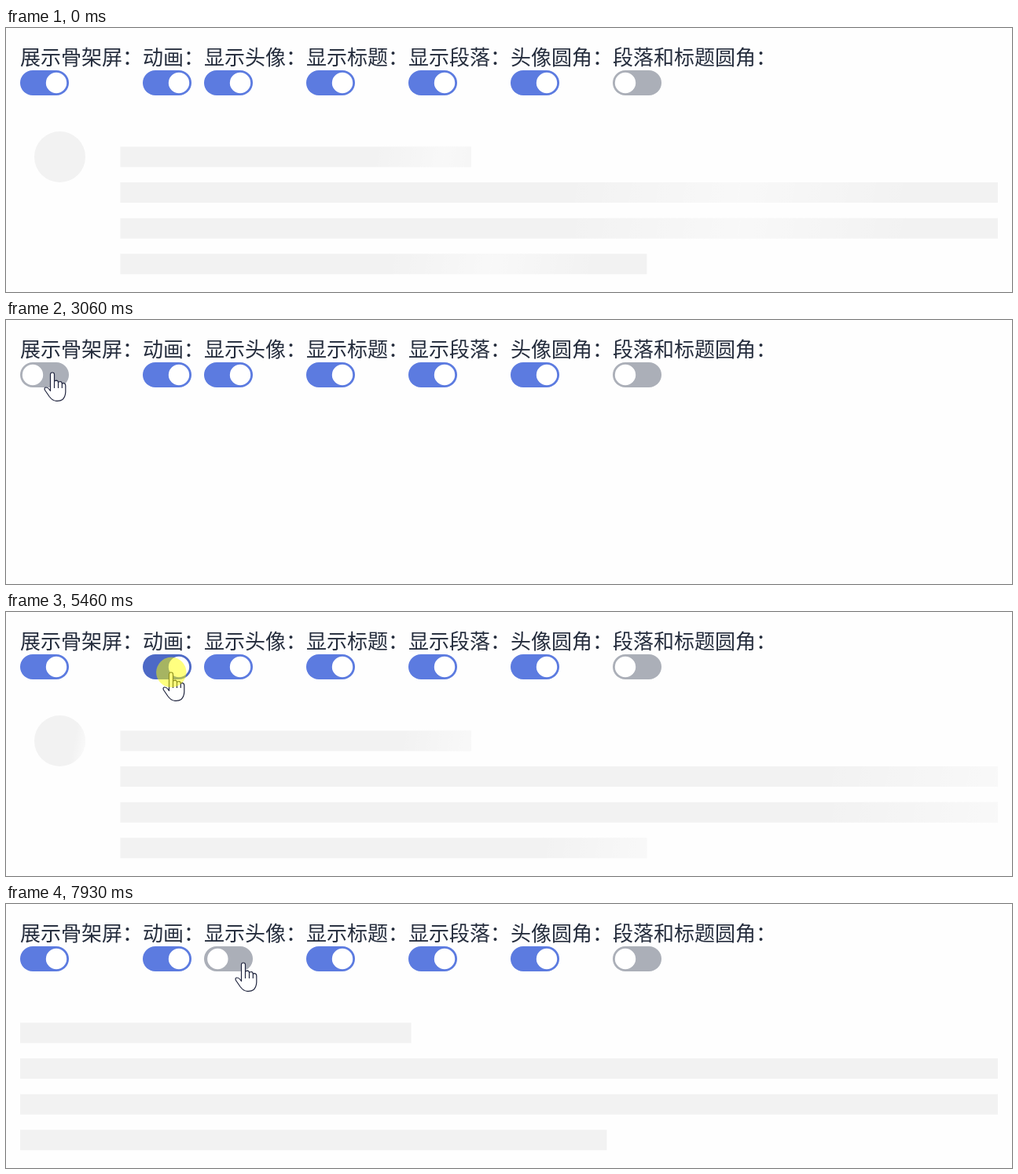
Write an HTML page with a canvas that moves like this. It is 1280x337 px and loops after 8000 ms.

```html
<!DOCTYPE html>
<html lang="zh-CN">
<head>
<meta charset="utf-8">
<title>骨架屏</title>
<style>
  html, body { margin: 0; width: 100%; height: 100%; overflow: hidden; background: #fefefe; }
  body { position: relative; font: 26px/26px "Noto Sans CJK SC", "Noto Sans CJK", sans-serif; color: #242c3c; }
  span { position: absolute; top: 23px; white-space: nowrap; }
  canvas { position: absolute; left: 0; top: 0; }
</style>
</head>
<body>
<canvas id="stage" width="1280" height="337"></canvas>
<script>
const LOOP = 8000;
const canvas = document.getElementById('stage');
const ctx = canvas.getContext('2d');

const ON = [92, 123, 224], HOVER = [77, 105, 198], OFF = [171, 175, 184];
const FILL = '#f2f2f2';

// flips: times at which a switch changes state; hover: when the pointer is over it
const switches = [
  { text: '展示骨架屏：', x: 18, on: true, flips: [2720, 3925], hover: [2230, 4560] },
  { text: '动画：', x: 174, on: true, flips: [5480, 7220], hover: [4735, 7380] },
  { text: '显示头像：', x: 252, on: true, flips: [7795], hover: [7500, LOOP] },
  { text: '显示标题：', x: 382, on: true },
  { text: '显示段落：', x: 512, on: true },
  { text: '头像圆角：', x: 642, on: true },
  { text: '段落和标题圆角：', x: 772, on: false }
];
const HIDE = 2720, SHOW = 3905, STILL = 5480, SHIMMER = 7220, NO_AVATAR = 7790;
const presses = [[2580, 2720], [3720, 3905], [5320, 5480], [7080, 7220], [7650, 7785]];

// pointer tracks: [time, x, y]
const pass = [[760, 256, 322], [880, 215, 252], [1000, 150, 210], [1110, 90, 250], [1235, 51, 337]];
const work = [
  [1730, -4, 290], [1900, 12, 225], [2080, 38, 130], [2230, 56, 74], [2300, 58, 66],
  [2800, 58, 66], [2870, 59, 67], [4470, 59, 67], [4600, 110, 69], [4750, 196, 73],
  [4890, 207, 76], [5030, 210, 77], [7290, 210, 77], [7390, 240, 76], [7500, 290, 75],
  [7590, 302, 75], [LOOP, 302, 75]
];

const hand = new Path2D(
  'M-2.5 2.5Q-2.5 0 0 0Q2.5 0 2.5 2.5V12Q2.8 10.2 5 10.2Q7.5 10.3 7.5 13' +
  'Q8 11.5 10 11.5Q12.3 11.8 12.3 14.5Q12.8 13.4 14.5 13.6Q16.8 14 16.8 17V25' +
  'Q16.5 31 13 34.5Q10 36.8 5 36.4Q0 36 -4 30.5L-9.5 22.5Q-10.8 19.5 -8.4 19' +
  'Q-6 18.8 -4 21.5L-2.5 23.5ZM2.5 12V19.5M7.5 13V19.5M12.3 14.5V19.5');
const arrow = new Path2D('M0 0V25L5.8 19.8L9.6 28.4L13.4 26.8L9.8 18.4H17.6Z');

for (const s of switches) {
  const label = document.createElement('span');
  label.textContent = s.text;
  label.style.left = s.x + 'px';
  document.body.insertBefore(label, canvas);
}

const clamp = v => Math.min(1, Math.max(0, v));
const ramp = (t, start, length) => clamp((t - start) / length);
const mix = (a, b, k) => a + (b - a) * k;
const mixColor = (a, b, k) => a.map((v, i) => mix(v, b[i], k));

// cubic-bezier(.42, 0, .58, 1)
function easeInOut(x) {
  let lo = 0, hi = 1, u = x;
  for (let i = 0; i < 18; i++) {
    u = (lo + hi) / 2;
    const at = 1.26 * u * (1 - u) * (1 - u) + 1.74 * u * u * (1 - u) + u * u * u;
    if (at < x) lo = u; else hi = u;
  }
  return u * u * (3 - 2 * u);
}

function along(track, t) {
  let i = 1;
  while (i < track.length - 1 && t > track[i][0]) i++;
  const [t0, x0, y0] = track[i - 1], [t1, x1, y1] = track[i];
  const k = ramp(t, t0, t1 - t0);
  return [mix(x0, x1, k), mix(y0, y1, k)];
}

// state of a switch, 0 to 1
function level(s, t, length) {
  let from = s.on ? 1 : 0, value = from;
  for (const flip of s.flips || []) {
    if (t < flip) break;
    value = mix(from, 1 - from, easeInOut(ramp(t, flip, length)));
    from = 1 - from;
  }
  return value;
}

function drawSwitch(s, t) {
  const over = s.hover ? ramp(t, s.hover[0], 250) - ramp(t, s.hover[1], 250) : 0;
  const color = mixColor(OFF, mixColor(ON, HOVER, over), level(s, t, 100));
  ctx.fillStyle = `rgb(${color.map(Math.round)})`;
  ctx.beginPath();
  ctx.roundRect(s.x, 54, 62, 32, 16);
  ctx.fill();
  ctx.fillStyle = '#fff';
  ctx.beginPath();
  ctx.arc(s.x + mix(16, 46, level(s, t, 160)), 70, 13.2, 0, 7);
  ctx.fill();
}

// a block with a light band, tilted by 10 degrees, on a tile twice its width
function block(x, y, w, h, radius, phase) {
  ctx.beginPath();
  ctx.roundRect(x, y, w, h, radius);
  ctx.fillStyle = FILL;
  ctx.fill();
  if (phase === null) return;
  const k = easeInOut((phase / 2000) % 1);
  const cx = x + w * mix(-0.8, 1.2, k), cy = y + h / 2;
  const dx = Math.sin(Math.PI / 1.8), dy = -Math.cos(Math.PI / 1.8);
  const half = (2 * w * dx + h * dy) / 10;
  const g = ctx.createLinearGradient(cx - dx * half, cy - dy * half, cx + dx * half, cy + dy * half);
  g.addColorStop(0, 'rgba(255,255,255,0)');
  g.addColorStop(0.5, 'rgba(255,255,255,.5)');
  g.addColorStop(1, 'rgba(255,255,255,0)');
  ctx.fillStyle = g;
  ctx.fill();
}

function drawSkeleton(t) {
  if (t >= HIDE && t < SHOW) return;
  const phase = first =>
    t < HIDE ? t + first : t < STILL ? t - SHOW : t < SHIMMER ? null : t - SHIMMER;
  const avatar = t < NO_AVATAR;
  const x = avatar ? 145.4 : 18, w = 1262 - x;
  if (avatar) block(36, 132, 65, 65, 32.5, phase(130));
  block(x, 151.5, w * 0.4, 26, 0, phase(1480));
  block(x, 197, w, 26, 0, phase(1310));
  block(x, 242.7, w, 26, 0, phase(1310));
  block(x, 288.2, w * 0.6, 26, 0, phase(1310));
}

function drawPointer(t) {
  const passing = t >= 760 && t < 1235;
  if (!passing && t < 1730) return;
  const [x, y] = along(passing ? pass : work, t);
  const shape = switches.some(s => s.hover && x >= s.x && x <= s.x + 62 && y >= 54 && y <= 86) ? hand : arrow;
  ctx.save();
  ctx.translate(x, y);
  ctx.fillStyle = '#fff';
  ctx.strokeStyle = '#20253f';
  ctx.lineWidth = 1.2;
  ctx.lineJoin = ctx.lineCap = 'round';
  ctx.fill(shape);
  ctx.stroke(shape);
  ctx.restore();
  if (presses.some(([a, b]) => t >= a && t < b)) {
    ctx.fillStyle = 'rgba(255,255,0,.5)';
    ctx.beginPath();
    ctx.arc(x + 0.3, y, 19.2, 0, 7);
    ctx.fill();
  }
}

function draw(t) {
  ctx.clearRect(0, 0, 1280, 337);
  drawSkeleton(t);
  for (const s of switches) drawSwitch(s, t);
  drawPointer(t);
}

const start = performance.now();
function tick() {
  draw((performance.now() - start) % LOOP);
  requestAnimationFrame(tick);
}
tick();
</script>
</body>
</html>
```
